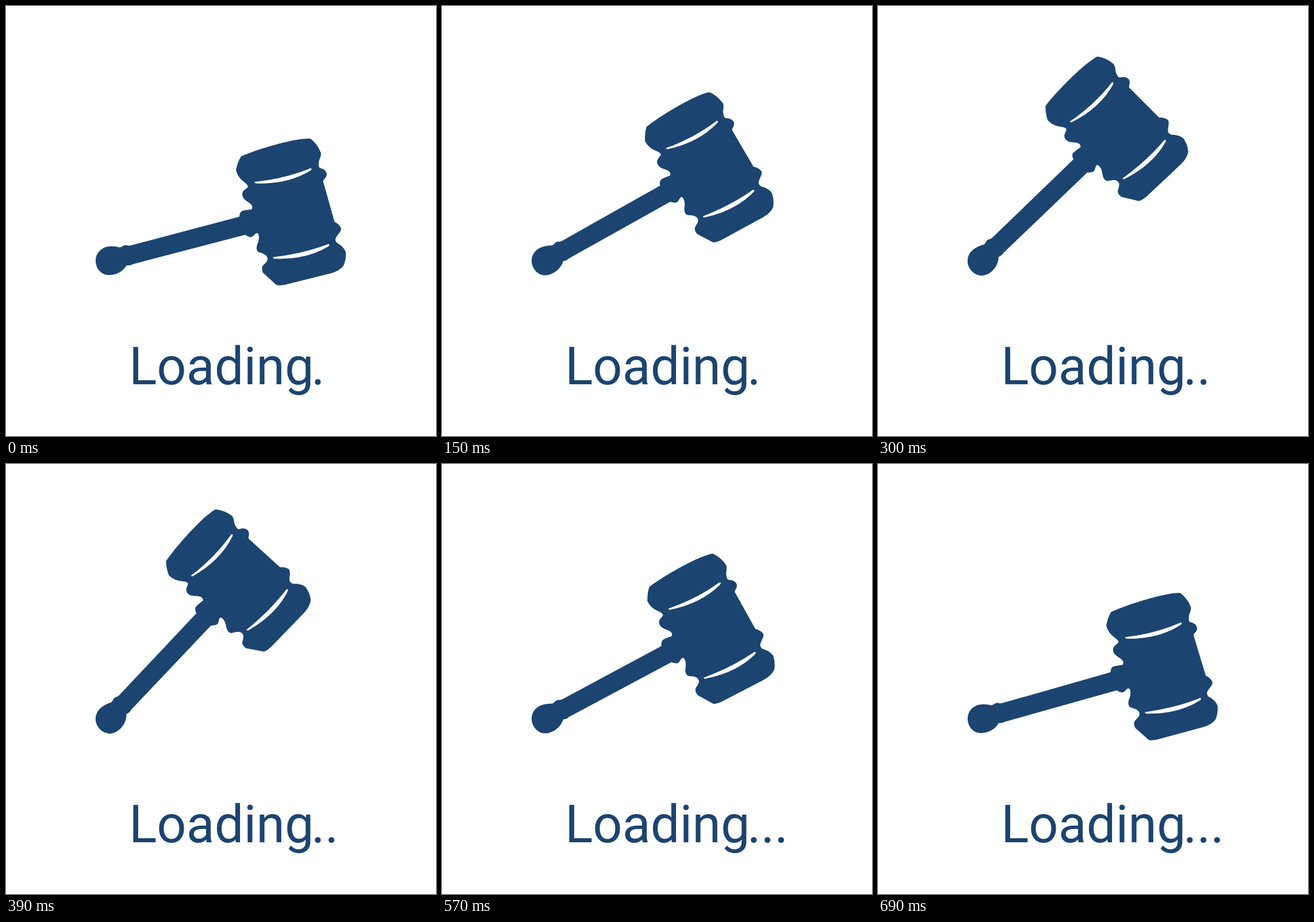
These frames come from a looping animation (748x748 px, 0.72 s). An HTML page:

```html
<!DOCTYPE html>
<html lang="en">
<head>
<meta charset="utf-8">
<title>Loading</title>
<style>
  html, body { margin: 0; width: 100%; height: 100%; overflow: hidden; background: #fff; }
  svg { display: block; width: 100vw; height: 100vh; fill: #1b4470; }
  text { font: 90px Roboto, sans-serif; }
</style>
</head>
<body>
<svg viewBox="0 0 748 748">
  <g id="gavel">
    <path d="M156 443 C156 430 166 418 183 418 Q192 418 198 420 Q202 419 204 417 Q209 415 212 417 L217 416.5
      L406 366.5 Q406 360 410 357 Q415 355 427 354 Q430 350 427 346 C424 341 411 338 411 327
      C411 320 420 318 421 314 C419 306 405 305 400 285 Q403 271 409 261.5
      C440 248 498 232 520 231 Q527 230 530 231 Q542 240 548 256 C548 264 544 267 544 273
      Q543 281 547 282 Q556 284 558 292 C558 299 553 300 551.5 304.5
      L571.5 375.5 C577 378 583 384 583 388 C582 395 573 400 573 407 Q574 412 579 414
      Q588 420 591 428 Q592 441 587 452 Q580 461 565 465 L485 485 Q473 487 470 485
      L447 464 Q444 457 446 453 C449 448 455 446 455 440 C455 432 445 430 439 428
      Q434 424 437 415 C440 408 441 402 439 397 Q437 393 433 397 Q429 402 425 402 Q420 401 416 398
      L221 449 Q216 452 210 451 C203 462 192 468 179 468 C166 468 156 457 156 443Z"/>
    <path fill="#fff" d="M432 306 Q485 301 530 282 Q533 283 530 286 Q490 311 434 308.5Z
      M464 437 Q516 431 561 414 Q564 415 561 418 Q522 442 466 439.5Z"/>
  </g>
  <text x="213.9" y="658">Loading<tspan id="dots" dx="-4.5">.</tspan></text>
</svg>
<script>
  const STEP = 30, STEPS = 24, PEAK = 12, LIFT = 35;
  const gavel = document.getElementById('gavel');
  const dots = document.getElementById('dots');

  function draw(now) {
    const step = Math.floor(now / STEP) % STEPS;
    // Steady lift, then a slightly faster fall
    const angle = step <= PEAK ? LIFT * step / PEAK : LIFT - 3.085 * (step - PEAK);
    gavel.setAttribute('transform', `rotate(${-angle} 181.5 443.5)`);
    dots.textContent = '.'.repeat(1 + Math.floor(step / 8));
  }

  const start = performance.now();
  function tick() {
    draw(performance.now() - start);
    requestAnimationFrame(tick);
  }
  tick();
</script>
</body>
</html>
```
